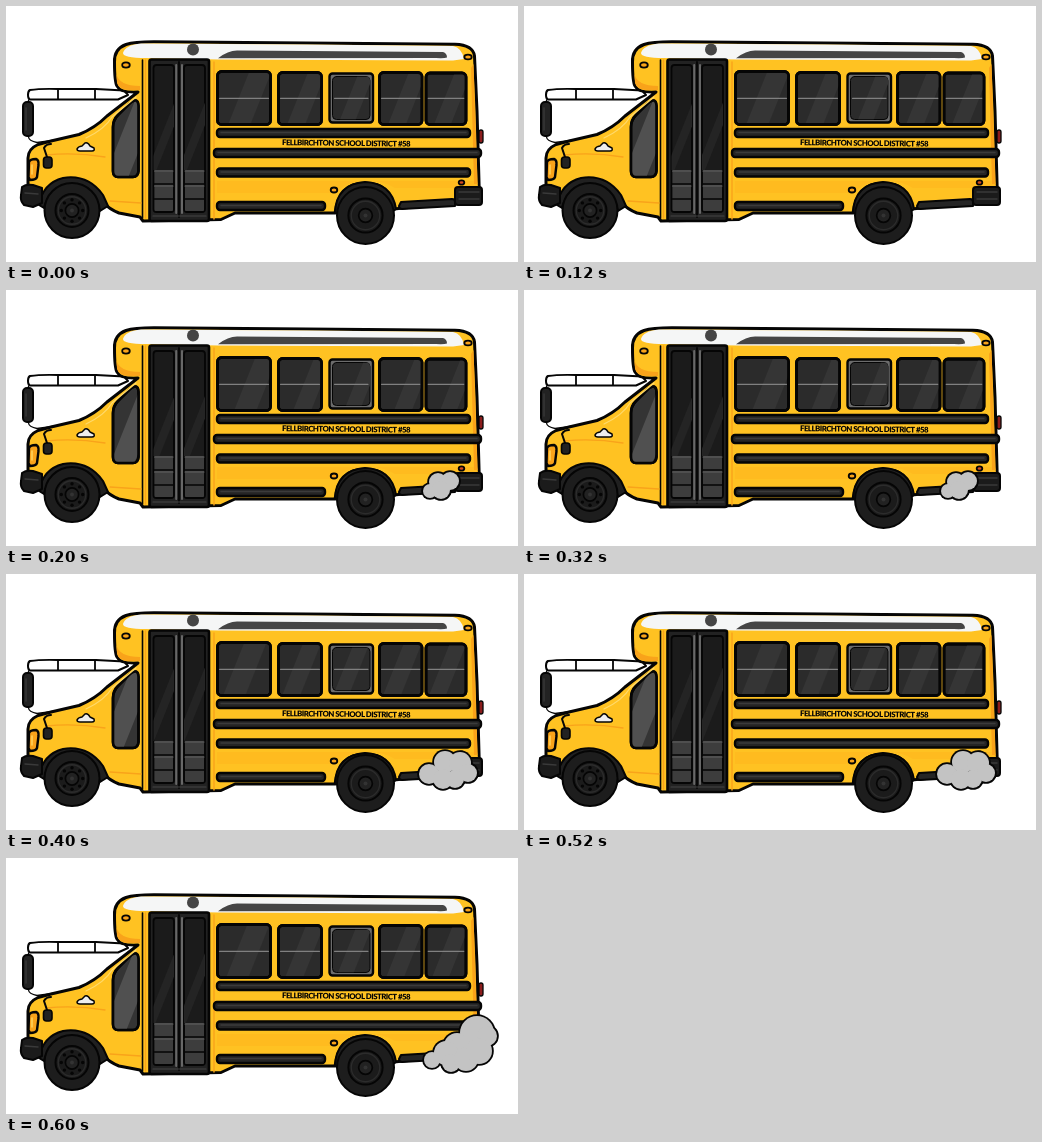
Recreate the animation shown at these times as an HTML page with a canvas. Size 512 px wide and 256 px high, loop 800 ms.

```html
<!DOCTYPE html>
<html lang="en">
<head>
<meta charset="utf-8">
<title>School bus</title>
<style>
html, body { margin: 0; width: 100%; height: 100%; overflow: hidden; background: #fff; }
canvas { display: block; width: 512px; height: 256px; }
</style>
</head>
<body>
<canvas id="stage" width="512" height="256"></canvas>
<script>
const ctx = document.getElementById('stage').getContext('2d');
const INK = '#050505', DARK = '#1b1b1b', YELLOW = '#ffc222', AMBER = '#f9a31a';
const STEP = 200;
const BOUNCE = [0, 2, 3, 1];
const SHINE = [0, 6, -5, -2];

function paint(path, fill, stroke, width = 2) {
  const p = typeof path === 'string' ? new Path2D(path) : path;
  if (fill) { ctx.fillStyle = fill; ctx.fill(p); }
  if (stroke) { ctx.strokeStyle = stroke; ctx.lineWidth = width; ctx.stroke(p); }
  return p;
}

function box(x, y, r, b, radius, fill, stroke, width) {
  const p = new Path2D();
  p.roundRect(x, y, r - x, b - y, radius);
  return paint(p, fill, stroke, width);
}

function oval(x, y, rx, ry, fill, stroke, width) {
  const p = new Path2D();
  p.ellipse(x, y, rx, ry, 0, 0, Math.PI * 2);
  return paint(p, fill, stroke, width);
}

// One broad slanted reflection clipped to a pane
function shine(pane, x, y, w, h, color) {
  ctx.save();
  ctx.clip(pane);
  paint(`M${x + h * 0.4} ${y}h${w}L${x + w} ${y + h}h${-w}Z`, color);
  ctx.restore();
}

function sideWindow(x, y, r, b, shift, framed) {
  if (framed) {
    box(x, y, r, b, 3, '#6c6c6c', INK, 2.4);
    x += 3; y += 3; r -= 3; b -= 3;
  }
  const pane = box(x, y, r, b, 4, '#2b2b2b', INK, framed ? 1 : 2.8);
  shine(pane, x + (r - x) * 0.2 + shift, y, (r - x) * 0.42, b - y, '#353535');
  paint(`M${x + 2} 92.3H${r - 2}`, null, '#808080', 1.2);
  if (!framed) paint(pane, null, INK, 2.8);
}

function rail(x, y, r, b) {
  box(x, y, r, b, 3, '#252525', INK, 2.4);
  paint(`M${x + 4} ${(y + b) / 2 - 0.5}H${r - 4}`, null, '#3b3b3b', 1.4);
}

function lamp(x, y, rx, ry, color) {
  oval(x, y, rx, ry, color, INK, 1.8);
}

function drawWindshield() {
  paint('M22.5 94V131Q23 135 31 136.5L50 134', null, INK, 1.3);
  paint('M24 84Q34 82.5 52 83L90 83L118 84.5L122 89L112 93.5H24Q22 93 22 89T24 84Z',
    '#fff', INK, 2);
  paint('M52 83V93M89 83V93', null, INK, 1.8);
  box(17, 96, 27, 130, 4, '#222', INK, 2);
  paint('M20 102V124', null, '#3a3a3a', 1.3);
}

function drawBody() {
  paint('M108.5 56Q108 43 120 38.5Q128 35.8 148 35.8L300 37L449 38.3Q467 39 468.5 50' +
    'L471 105L473.5 194L388 203Q385 177 359 177Q333 177 329 207H229L215 213.5L137 215' +
    'L134 211L113 207Q103 203 98 197L30 196L22 181V152Q22 143 32 138.5L45 135L73 128.5' +
    'Q89 122 101 110L132 86Q114 87 111 80Q108.5 76 108.5 56Z', YELLOW, INK, 3);
  // Lower and rear shading
  paint('M211 175H471L472 182H389Q377 174 359 175Q340 175 330 187H211Z', '#ffbb1f');
  paint('M465 62L467.5 58L471.5 178H468Z', AMBER);
  paint('M110.5 68Q113 80 134 80V84H127Q113 85 111 77Z', AMBER);

  // Roof
  paint('M117 47Q119 39 135 37.4L300 38.6L447 40Q456 42 458 53L447 54.5L213 53.5L140 52Q117 52 117 47Z',
    '#f5f6f6');
  paint('M212 52.2Q222 44.8 231 44.6L437 46Q441 47 441 51.5Q438 52.5 430 52Z', '#454545');
  oval(187, 43.5, 6, 6, '#454545');
  paint('M136.5 54V212', null, INK, 1.6);
  paint('M139.5 54V212M208 56V213', null, AMBER, 1.4);
}

function drawCab(shift) {
  const pane = paint('M107 121Q107 114 112 109L123 98Q132 90 132.5 100V165Q132 171 127 171' +
    'H112Q107 171 107 165Z', '#343434', INK, 2.6);
  shine(pane, 98 + shift, 94, 24, 78, '#505050');
  paint(pane, null, INK, 2.6);
  paint('M80 132Q99 123 106 111L130 91', null, '#ffda6b', 1.2);
  paint('M40 149Q69 146 99 151M104 195L135 197', null, AMBER, 1.3);
  paint('M71 143Q72 140.5 76 140L79 137Q82 136 84 140L88 142Q89 145 86 145H74Q71 145 71 143Z',
    '#eee', INK, 1.5);
  paint('M41 151L38 142Q40 138 45 138', null, INK, 2);
  box(37.5, 151, 46, 162, 3, '#222', INK, 1.6);
  paint('M23 156Q24 153 30 153Q33 154 32.5 159L31 171Q30 174 24 174L22.5 171Z', AMBER, INK, 2.4);
  paint('M26 159V168', null, '#ffd25a', 1.6);
}

function drawFenders() {
  paint('M33 199Q37 177 57 172Q82 168 97 189L102 200L94 205Q90 184 66 182Q42 183 38 202Z',
    '#202020', INK, 2);
  paint('M16 181Q20 178 27 179L36 182V197L27 201L18 199Q14 195 15 189Z', DARK, INK, 2);
  paint('M19 187L32 188', null, '#3a3a3a', 1.4);
  paint('M329 207Q330 178 359 176Q386 177 390 203L383 208H335Z', '#202020', INK, 2);
}

function drawDoor(shift) {
  box(143.5, 53.5, 203, 215, 2, '#222', INK, 2.6);
  for (const [l, r] of [[147.5, 168], [178, 199]]) {
    const pane = box(l, 59, r, 206, 3, DARK, INK, 1.8);
    shine(pane, l - 6 + shift, 62, 9, 102, '#242424');
    box(l + 1, 164, r - 1, 205, 1, '#3d3d3d');
    paint(`M${l + 1} 165H${r - 1}M${l + 1} 180H${r - 1}`, null, '#636363', 1.2);
    paint(`M${l + 1} 178H${r - 1}M${l + 1} 193H${r - 1}`, null, INK, 1.6);
  }
  paint('M170.2 59V207M176 59V207', null, '#686868', 2);
  paint('M173 56V211', null, INK, 1.8);
  paint('M147 210H200', null, '#444', 1.2);
}

function drawSide(shift) {
  const panes = [[211.5, 65.5, 264.5, 118.5], [272.5, 66.5, 315.5, 118.5], [323.5, 67.5, 367, 116.5],
    [373.5, 66.5, 416, 118.5], [420, 67, 460, 118.5]];
  panes.forEach((p, i) => sideWindow(...p, shift, i === 2));
  rail(211, 123, 464, 131);
  rail(208, 143, 475, 151);
  rail(211, 162.5, 464, 170.5);
  rail(211, 196, 319, 204);
  paint('M395 196L446 193Q449 193 449 196V200L396 203Q393 203 393 200Z', '#252525', INK, 2);
  box(449, 181, 476, 199, 3, DARK, INK, 2);
  paint('M453 186H473M453 193H473', null, '#3a3a3a', 1.4);

  lamp(120, 59, 3.8, 2.6, AMBER);
  lamp(462, 51, 3.7, 2.4, AMBER);
  lamp(328, 184, 3.3, 2.5, AMBER);
  lamp(455.5, 176.5, 2.8, 2.2, '#d44b20');
  box(473, 124, 477, 137, 2, '#8c1d1d', INK, 1.3);

  ctx.save();
  ctx.translate(340, 137.5);
  ctx.rotate(0.012);
  ctx.fillStyle = INK;
  ctx.font = '900 7.8px Lato, sans-serif';
  ctx.letterSpacing = '-0.5px';
  ctx.textAlign = 'center';
  ctx.textBaseline = 'middle';
  ctx.fillText('FELLBIRCHTON SCHOOL DISTRICT #58', 0, 0);
  ctx.restore();
}

function drawWheel(x, y, r, holes) {
  oval(x, y, r, r, '#1d1d1d', INK, 2);
  oval(x, y, r * 0.6, r * 0.6, '#1b1b1b', INK, 2);
  oval(x, y, r * 0.5, r * 0.5, null, '#2c2c2c', 1.3);
  for (let i = 0; i < holes; i++) {
    const a = i * Math.PI * 2 / holes;
    oval(x + Math.cos(a) * r * 0.39, y + Math.sin(a) * r * 0.39, 1.7, 1.7, INK);
  }
  oval(x, y, r * 0.24, r * 0.24, '#222', INK, 1.7);
  oval(x, y, 2, 2, '#333');
}

// Exhaust puffs as [x, y, radius] for each step
const PUFFS = [
  [],
  [[444, 191, 9], [432, 192, 9], [424, 201, 7], [435, 200, 9]],
  [[439, 188, 11], [454, 189, 11], [423, 200, 10], [462, 199, 9], [449, 205, 9], [437, 205, 10]],
  [[471, 175, 17], [481, 178, 10], [451, 188, 13], [440, 195, 12], [426, 202, 8],
    [445, 205, 9], [460, 201, 12], [473, 193, 13]]
];

function drawSmoke(step) {
  for (const [x, y, r] of PUFFS[step]) oval(x, y, r + 1.8, r + 1.8, INK);
  for (const [x, y, r] of PUFFS[step]) oval(x, y, r, r, '#c3c3c3');
}

function draw(step) {
  const shift = SHINE[step];
  ctx.fillStyle = '#fff';
  ctx.fillRect(0, 0, 512, 256);
  ctx.lineJoin = ctx.lineCap = 'round';
  ctx.save();
  ctx.translate(0, BOUNCE[step]);
  drawWindshield();
  drawBody();
  drawCab(shift);
  drawFenders();
  drawDoor(shift / 2);
  drawSide(shift);
  ctx.restore();
  drawWheel(66, 204.5, 27.5, 8);
  drawWheel(359.5, 209.5, 28.5, 0);
  drawSmoke(step);
}

const start = performance.now();
function tick() {
  draw(Math.floor((performance.now() - start) / STEP) % BOUNCE.length);
  requestAnimationFrame(tick);
}
tick();
</script>
</body>
</html>
```
